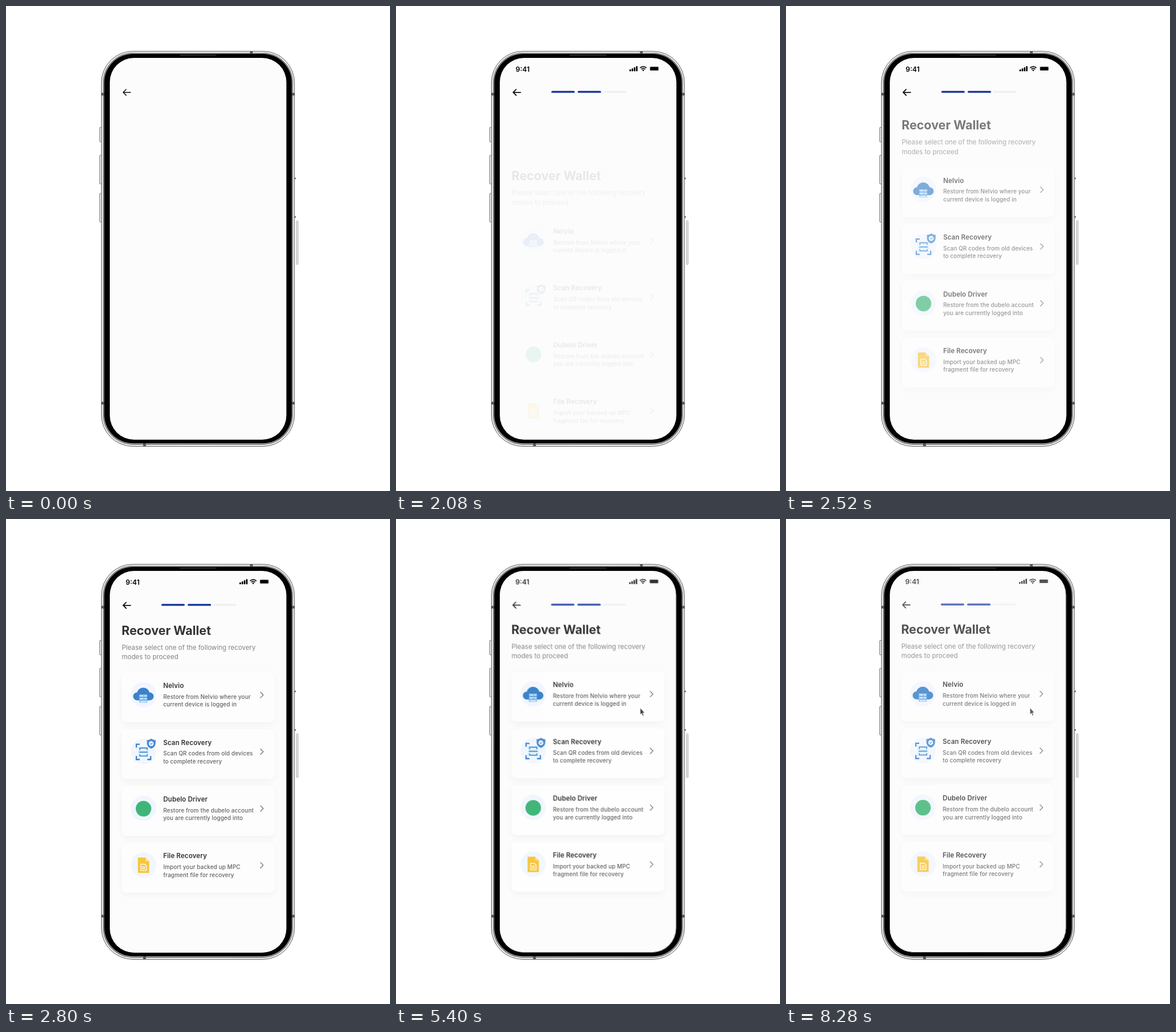
Recreate the animation shown at these times as an HTML page. Size 666 by 841 pixels, loop 9240 ms.

```html
<!DOCTYPE html>
<html lang="en">
<head>
<meta charset="utf-8">
<title>Recover wallet</title>
<style>
  html, body { margin: 0; width: 100%; height: 100%; overflow: hidden; background: #fff; }
  svg { display: block; width: 100%; height: 100%; }
  text { font-family: Inter, Roboto, sans-serif; }
  .clock { font-size: 12px; font-weight: 600; }
  .title { font-size: 21.2px; font-weight: 700; }
  .lead { font-size: 11.42px; fill: #666; }
  .name { font-size: 11.42px; font-weight: 600; letter-spacing: .12px; }
  .desc { font-size: 9.8px; font-weight: 500; letter-spacing: .12px; fill: #3c3c3c; }
  .line { fill: none; stroke-linecap: round; stroke-linejoin: round; }
</style>
</head>
<body>
<svg viewBox="0 0 666 841">
  <defs>
    <clipPath id="glass"><rect x="180" y="90" width="306.3" height="662" rx="42"/></clipPath>
    <filter id="shade" x="-20%" y="-40%" width="140%" height="200%">
      <feDropShadow dx="0" dy="4" stdDeviation="6" flood-color="#000" flood-opacity=".055"/>
    </filter>
    <linearGradient id="rim">
      <stop offset="0" stop-color="#f4f4f4"/>
      <stop offset=".5" stop-color="#fff"/>
      <stop offset="1" stop-color="#f4f4f4"/>
    </linearGradient>
    <path id="arrow" class="line" d="M216 149.7H203.3M208.4 144.5L203.2 149.7L208.4 154.9" stroke="#111" stroke-width="1.5"/>

    <g id="iconCloud">
      <path d="M-11 9.5A6.8 6.8 0 0 1 -11.3 -4.2A11.3 11.3 0 0 1 10.5 -4.3A6.9 6.9 0 0 1 11 9.5Z" fill="#0c64bd"/>
      <g fill="#71b5f0">
        <rect x="-7.5" y="-.6" width="14" height="4.3" rx=".6"/>
        <rect x="-7.5" y="4.5" width="14" height="4.3" rx=".6"/>
        <rect x="-7.5" y="9.6" width="14" height="4" rx=".6"/>
      </g>
      <path d="M-5.5 1.6H-1M2 1.6H4.8M-5.5 6.7H-1M2 6.7H4.8M-5.5 11.6H4.8" stroke="#fff" stroke-width="1.3"/>
    </g>

    <g id="iconScan">
      <rect x="-9.5" y="-9" width="19" height="19" rx="2" fill="#d9effd"/>
      <g fill="none" stroke="#0d66bf" stroke-width="2.3">
        <path d="M-12.4 -7V-12.8H-6.5M-12.4 7.5V13.6H-6.5M12.4 7.5V13.6H6.5"/>
        <path d="M-6.3 -2.6V-6.3H6.3V-2.6M-6.3 4.6V7.6H6.3V4.6" stroke-width="1.7"/>
        <path d="M-7.5 .9H7.5" stroke-width="1.8"/>
      </g>
      <path d="M13.4 -22.7C16 -20.8 18.4 -20.2 21 -20.2V-14.8C21 -9.8 17.8 -6.8 13.4 -5.2C9 -6.8 5.9 -9.8 5.9 -14.8V-20.2C8.5 -20.2 11 -20.8 13.4 -22.7Z" fill="#1c70c6"/>
      <circle cx="13.4" cy="-14" r="4.2" fill="#fff"/>
      <path class="line" d="M11.6 -14L13 -12.6L15.4 -15.2" stroke="#1c70c6" stroke-width="1.2"/>
    </g>

    <circle id="iconDrive" cy=".5" r="13.5" fill="#11a556"/>

    <g id="iconFile">
      <path d="M-8.6 -13.2H3.6L9.8 -7V12.2A1.3 1.3 0 0 1 8.5 13.5H-8.5A1.3 1.3 0 0 1 -9.8 12.2V-12A1.2 1.2 0 0 1 -8.6 -13.2Z" fill="#f7b90f"/>
      <path d="M3.6 -13.2L9.8 -7H3.6Z" fill="#fbdc87"/>
      <path class="line" d="M-4.6 -1.8H2L5 1.2V9.3H-4.6ZM-2.2 3.2H2.4M-2.2 6.2H2.4" stroke="#fff" stroke-width="1.3"/>
    </g>
  </defs>

  <rect width="666" height="841" fill="#fff"/>

  <g id="phone">
    <g fill="#eee" stroke="#555" stroke-width=".8">
      <rect x="162.4" y="210.5" width="3.6" height="25" rx="1"/>
      <rect x="162.4" y="259" width="3.6" height="49.5" rx="1"/>
      <rect x="162.4" y="325" width="3.6" height="49.5" rx="1"/>
    </g>
    <rect x="503.6" y="372.3" width="3.2" height="76" rx="1" fill="#ddd" stroke="#aaa" stroke-width=".7"/>
    <path d="M501.5 297.7V300.3M501.5 364.5V367" stroke="#222" stroke-width="1.6"/>
    <rect x="165.5" y="78.5" width="334.7" height="685" rx="54.5" fill="url(#rim)" stroke="#444" stroke-width=".9"/>
    <rect x="168.8" y="81.6" width="328.2" height="678.6" rx="51.5" fill="#aaa" stroke="#777" stroke-width="1.4"/>
    <g fill="#555">
      <rect x="165.4" y="150.6" width="6" height="4.6"/><rect x="494.5" y="150.6" width="6" height="4.6"/>
      <rect x="165.4" y="686.4" width="6" height="4.6"/><rect x="494.5" y="686.4" width="6" height="4.6"/>
      <rect x="423.2" y="78.4" width="4.8" height="6"/><rect x="237.8" y="757.5" width="4.8" height="6"/>
    </g>
    <rect x="170.3" y="83" width="325.4" height="675.3" rx="50" fill="#000"/>
    <rect x="301" y="84" width="64" height="3" rx="1.5" fill="#1b1b1b"/>
  </g>

  <g clip-path="url(#glass)">
    <rect x="180" y="90" width="307" height="662" fill="#fcfcfc"/>
    <g id="content">
      <use href="#arrow"/>
      <g id="status">
        <text class="clock" x="207.6" y="113.6">9:41</text>
        <g id="bars"></g>
        <g class="line" stroke="#000" stroke-width="1.8" style="stroke-linecap:butt">
          <path d="M423.3 107.4A7.8 7.8 0 0 1 434.3 107.4M425.4 109.7A4.8 4.8 0 0 1 432.2 109.7"/>
        </g>
        <path d="M428.8 113.2L426.9 111.3A2.8 2.8 0 0 1 430.7 111.3Z"/>
        <rect x="439.2" y="104.2" width="17" height="9" rx="2.4" fill="none" stroke="#000" stroke-opacity=".1" stroke-width=".7"/>
        <rect x="440.6" y="105.6" width="14.6" height="6.2" rx="1.2"/>
      </g>
      <g id="nav">
        <use href="#arrow"/>
        <rect x="269.4" y="147.3" width="40.6" height="3.3" rx="1.6" fill="#13329b"/>
        <rect x="315.1" y="147.3" width="40.6" height="3.3" rx="1.6" fill="#13329b"/>
        <rect x="359.6" y="147.3" width="40" height="3.3" rx="1.6" fill="#f0f0f0"/>
      </g>
      <g id="list">
        <text class="title" x="200.6" y="199.6">Recover Wallet</text>
        <text class="lead" x="200.8" y="225.5">Please select one of the following recovery</text>
        <text class="lead" x="200.8" y="242">modes to proceed</text>
      </g>
      <path id="cursor" d="M424 328V339.8L426.6 337.4L428.3 341.8L430.3 341L428.5 336.8L431.8 336.5Z" fill="#111" stroke="#fff" stroke-width=".7"/>
    </g>
    <g id="dim">
      <rect x="180" y="90" width="307" height="662" fill="#000"/>
      <g transform="translate(-.9 -.7)">
        <rect x="180" y="90" width="306.3" height="662" rx="42" fill="#fcfcfc"/>
        <use href="#content" opacity=".67"/>
      </g>
    </g>
    <g id="loader">
      <rect x="272" y="402" width="122" height="28.5" fill="#fdfdfd"/>
    </g>
  </g>
</svg>

<script>
const LOOP = 9240, TICK = 40;
const NS = "http://www.w3.org/2000/svg";
const $ = id => document.getElementById(id);

function add(parent, tag, attrs, text) {
  const el = document.createElementNS(NS, tag);
  for (const key in attrs) el.setAttribute(key, attrs[key]);
  if (text) el.textContent = text;
  parent.appendChild(el);
  return el;
}

[3.2, 5, 7, 9].forEach((h, i) =>
  add($("bars"), "rect", { x: 404.9 + i * 3.8, y: 113.2 - h, width: 2.6, height: h, rx: .7 }));

const cards = [
  ["iconCloud", "Nelvio", "Restore from Nelvio where your", "current device is logged in"],
  ["iconScan", "Scan Recovery", "Scan QR codes from old devices", "to complete recovery"],
  ["iconDrive", "Dubelo Driver", "Restore from the dubelo account", "you are currently logged into"],
  ["iconFile", "File Recovery", "Import your backed up MPC", "fragment file for recovery"]
];

cards.forEach(([icon, name, first, second], i) => {
  const g = add($("list"), "g", { transform: `translate(0 ${265 + i * 98.45})` });
  add(g, "rect", { x: 201, width: 264.6, height: 86.3, rx: 8, fill: "#fefefe", filter: "url(#shade)" });
  add(g, "circle", { cx: 238.5, cy: 38.6, r: 22, fill: "#eff5ff" });
  add(g, "use", { href: "#" + icon, transform: "translate(238.5 38.9)" });
  add(g, "text", { class: "name", x: 272.7, y: 27.1 }, name);
  add(g, "text", { class: "desc", x: 272.7, y: 45.9 }, first);
  add(g, "text", { class: "desc", x: 272.7, y: 59.4 }, second);
  add(g, "path", { class: "line", d: "M441.4 34.2L446.2 39L441.4 43.8", stroke: "#555", "stroke-width": 1.3 });
});

const dots = Array.from({ length: 5 }, (_, i) =>
  add($("loader"), "circle", { cx: 291.6 + i * 20.75, cy: 421, fill: "#1366c6" }));

const clamp = v => Math.max(0, Math.min(1, v));
const phase = (t, start, wait = 0) => t < start + wait ? 0 : clamp((t - start) / 1000);

// Fades linearly while sliding in with a cubic ease-out.
function enter(id, p, dx, dy) {
  const k = (1 - p) ** 3;
  $(id).setAttribute("transform", `translate(${dx * k} ${dy * k})`);
  $(id).setAttribute("opacity", p);
}

const show = (id, on) => $(id).setAttribute("display", on ? "inline" : "none");

function draw(ms) {
  const t = Math.floor((ms % LOOP) / TICK) * TICK;
  enter("status", phase(t, 0, 80), -17, 0);
  enter("nav", phase(t, 1000, 80), -21, 0);
  enter("list", phase(t, 2000, 80), 0, 132);
  $("cursor").setAttribute("opacity", phase(t, 3000));

  const fade = 1 - (1 - phase(t, 5000)) ** 2;
  show("dim", fade > 0);
  $("dim").setAttribute("opacity", fade);

  show("loader", t >= 5920 && t < 8280);
  dots.forEach((dot, i) => {
    const angle = (t - 7000) / 1000 * 2 * Math.PI - i * .66;
    dot.setAttribute("r", 5.6 + 3.9 * Math.cos(angle));
  });
}

let begin;
function frame(now) {
  begin ??= now;
  draw(now - begin);
  requestAnimationFrame(frame);
}
draw(0);
requestAnimationFrame(frame);
</script>
</body>
</html>
```
